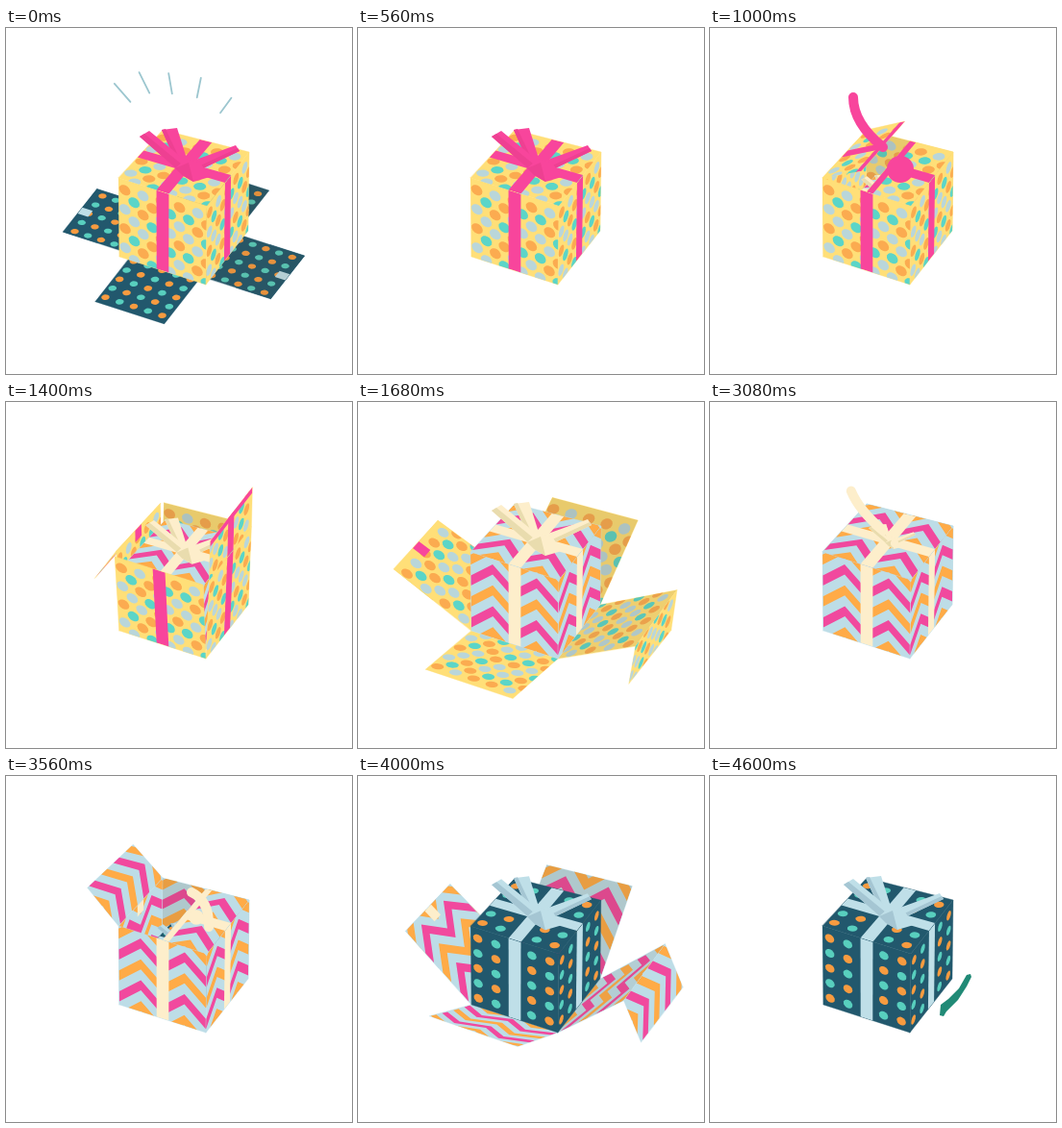
Animation, 360 px wide and 360 px high, one loop 5 s. Source, as an HTML page with a canvas:

```html
<!DOCTYPE html>
<html lang="en">
<head>
<meta charset="utf-8">
<title>Endless gift</title>
<style>
html, body { margin: 0; height: 100%; overflow: hidden; background: #fff; }
canvas { display: block; width: 100vw; height: 100vh; object-fit: contain; }
</style>
</head>
<body>
<canvas id="stage"></canvas>
<script>
const stage = document.getElementById('stage');
const ctx = stage.getContext('2d');
const ratio = window.devicePixelRatio || 1;
stage.width = stage.height = 360 * ratio;

const LOOP = 5000;
const CENTER = [185, 225];
const { sin, cos, PI } = Math;
const rad = deg => deg * PI / 180;
const clamp = x => Math.min(1, Math.max(0, x));
const span = (x, a, b) => clamp((x - a) / (b - a));
const mix = (a, b, k) => a + (b - a) * k;
const easeOut = k => 1 - (1 - k) ** 2;

const yellow = { base: '#ffdf78', ribbon: '#f8459c', shade: '#ee4092', pattern: bigDots };
const zigzag = { base: '#bddde7', ribbon: '#fdeecb', shade: '#e9dcae', pattern: chevrons };
const blue = { base: '#22586d', ribbon: '#bfdfe8', shade: '#a5c6d3', pattern: smallDots };

// Unit cube to stage: x along the front, y into depth, z up.
function project(x, y, z) {
  const lean = z * y * (1 - x);
  return [
    118 + 90 * x + 44 * y - z + 2 * z * x + 2 * lean,
    238 + 29 * x - 56 * y - 82 * z + 6 * lean
  ];
}

function polygon(points, color) {
  ctx.beginPath();
  points.forEach(p => ctx.lineTo(p[0], p[1]));
  ctx.closePath();
  if (color) {
    ctx.fillStyle = color;
    ctx.fill();
  }
}

const patch = (map, u0, u1, v0, v1) =>
  [map(u0, v0), map(u1, v0), map(u1, v1), map(u0, v1)];

function dot(map, u, v, r, color) {
  const ring = [];
  for (let i = 0; i < 18; i++) {
    const a = i * PI / 9;
    ring.push(map(u + r * cos(a), v + r * sin(a)));
  }
  polygon(ring, color);
}

function bigDots(map) {
  const orange = '#fbab50', grey = '#b9d6da', teal = '#5bd5c8';
  const rows = [[orange, grey], [teal, orange], [grey, orange], [grey, teal]];
  for (let row = 0; row < 8; row++) {
    for (let col = 0; col < 5; col++) {
      const u = 0.07 + col * 0.207 + (row % 2) * 0.104;
      dot(map, u, 0.13 + (row - 0) * 0.122, 0.064, rows[row % 4][col % 2 ^ (col > 2)]);
    }
  }
}

function smallDots(map) {
  for (let row = 0; row < 5; row++) {
    for (let col = 0; col < 5; col++) {
      const color = (row + col) % 2 ? '#58cfbe' : '#f79b40';
      dot(map, 0.08 + col * 0.205, 0.13 + row * 0.19, 0.052, color);
    }
  }
}

function chevrons(map) {
  for (let k = 0; k < 6; k++) {
    const top = k * 0.265 - 0.46, upper = [], lower = [];
    for (let i = 0; i <= 4; i++) {
      const v = top + (i % 2 ? 0 : 0.23);
      upper.push(map(i / 4, v));
      lower.unshift(map(i / 4, v + 0.128));
    }
    polygon(upper.concat(lower), k % 2 ? '#ffab47' : '#f1499e');
  }
}

// opts: u range, ribbon along and across, tape on the rim, darkness
function face(map, wrap, { u0 = 0, u1 = 1, band, cross, tape, dark = 0 } = {}) {
  const outline = patch(map, u0, u1, 0, 1);
  ctx.save();
  polygon(outline, wrap.base);
  ctx.strokeStyle = wrap.base;
  ctx.lineWidth = 0.4;
  ctx.lineJoin = 'round';
  ctx.stroke();
  ctx.clip();
  wrap.pattern(map);
  if (band) polygon(patch(map, 0.43, 0.57, 0, 1), wrap.ribbon);
  if (cross) polygon(patch(map, 0, 1, 0.43, 0.57), wrap.ribbon);
  if (tape) polygon(patch(map, 0.43, 0.57, 0, 0.15), wrap.ribbon);
  if (dark) polygon(outline, `rgba(90, 70, 40, ${dark})`);
  ctx.restore();
}

function facesOut(map) {
  const o = map(0, 1), a = map(1, 1), b = map(0, 0);
  return (a[0] - o[0]) * (b[1] - o[1]) - (a[1] - o[1]) * (b[0] - o[0]) < 0;
}

function bow(wrap, size) {
  if (size <= 0) return;
  ctx.save();
  ctx.translate(188, 147);
  ctx.scale(size, size);
  ctx.translate(-188, -147);
  polygon([[162, 106], [178, 104], [190, 142], [179, 144]], wrap.ribbon);
  polygon([[162, 106], [166, 105], [184, 143], [179, 144]], wrap.shade);
  polygon([[139, 113], [149, 107], [187, 138], [178, 147]], wrap.ribbon);
  polygon([[139, 113], [144, 110], [183, 142], [178, 147]], wrap.shade);
  polygon([[239, 122], [243, 128], [203, 147], [192, 139]], wrap.ribbon);
  polygon([[241, 125], [243, 128], [203, 147], [198, 145]], wrap.shade);
  polygon([[176, 146], [187, 136], [202, 140], [212, 155], [195, 160], [183, 153]], wrap.ribbon);
  polygon([[176, 146], [190, 140], [195, 160], [183, 153]], wrap.shade);
  ctx.restore();
}

function curve(from, ctrl, to, width, color) {
  ctx.beginPath();
  ctx.moveTo(...from);
  ctx.quadraticCurveTo(...ctrl, ...to);
  ctx.lineWidth = width;
  ctx.strokeStyle = color;
  ctx.stroke();
}

function untie(wrap, p) {
  bow(wrap, 1 - span(p, 0, 300));
  const knot = 14 * span(p, 100, 300) * (1 - span(p, 540, 760));
  if (knot > 0) {
    ctx.beginPath();
    ctx.arc(mix(188, 198, span(p, 0, 400)), 147, knot, 0, 2 * PI);
    ctx.fillStyle = wrap.ribbon;
    ctx.fill();
  }
  if (p > 60 && p < 560) {
    const up = easeOut(span(p, 60, 440)), away = span(p, 440, 560);
    curve([mix(mix(145, 149, up), 108, away), mix(mix(110, 72, up), 58, away)],
      [mix(mix(160, 149, up), 114, away), mix(mix(124, 99, up), 66, away)],
      [mix(180, 122, away), mix(mix(142, 124, up), 76, away)],
      10 * (1 - away), wrap.ribbon);
  }
  if (p > 520 && p < 760) {
    curve([193, 121], [212, 130], [211, 157],
      10 * span(p, 520, 600) * (1 - span(p, 660, 760)), wrap.ribbon);
  }
}

// Pieces of the wrapping at phase p; each one draws itself.
function pieces(wrap, p) {
  const fall = 90 * span(p, 788, 1188) ** 2;
  const s = sin(rad(fall)), c = cos(rad(fall));
  const frontFall = rad(90 * span(p, 750, 1150) ** 2);
  const leftTurn = 270 * span(p, 385, 900);
  const rightTurn = 270 * span(p, 642, 1242);
  const leftDir = rad(fall - 90 + leftTurn);
  const rightDir = rad(fall - 90 + rightTurn);

  const front = (u, v) => project(u, -1.1 * (1 - v) * sin(frontFall), (1 - v) * cos(frontFall));
  const right = (u, v) => project(1 + (1 - v) * s, u, (1 - v) * c);
  const left = (u, v) => project(-(1 - v) * s, u, (1 - v) * c);
  const back = (u, v) => project(u, 1 + (1 - v) * s, (1 - v) * c);
  const leftLid = (u, v) => project(-s - u * sin(leftDir), 1 - v, c + u * cos(leftDir));
  const rightLid = (u, v) =>
    project(1 + s + (1 - u) * sin(rightDir), 1 - v, c + (1 - u) * cos(rightDir));
  const top = (u, v) => project(u, 1 - v, 1);
  const lid = map => ({ band: facesOut(map), cross: facesOut(map) });

  return {
    leftTurn, rightTurn,
    front: () => face(front, wrap, { band: facesOut(front) }),
    right: () => {
      const out = facesOut(right);
      face(right, wrap, { band: out, tape: !out && rightTurn > 225, dark: out ? 0 : 0.1 });
    },
    left: () => face(left, wrap, { tape: true }),
    back: () => face(back, wrap, { dark: 0.14 }),
    leftLid: () => face(leftLid, wrap, { u1: 0.5, ...lid(leftLid) }),
    rightLid: () => face(rightLid, wrap, { u0: 0.5, ...lid(rightLid) }),
    top: () => face(top, wrap, lid(top))
  };
}

function closedBox(wrap) {
  const box = pieces(wrap, 0);
  box.front();
  box.right();
  box.top();
  bow(wrap, 1);
}

function scaled(k, draw) {
  ctx.save();
  ctx.translate(...CENTER);
  ctx.scale(k, k);
  ctx.translate(-CENTER[0], -CENTER[1]);
  draw();
  ctx.restore();
}

function sparkles(p) {
  const q = span(p, 1180, 1580);
  if (q <= 0 || q >= 1) return;
  const near = 0.55 + 0.5 * q * q, far = 0.55 + 0.5 * easeOut(q);
  ctx.strokeStyle = '#9cc6cf';
  ctx.lineWidth = 2.2 * (1 - q ** 4);
  for (const [x, y] of [[-73, -83], [-47, -95], [-16, -94], [18, -89], [50, -68]]) {
    ctx.beginPath();
    ctx.moveTo(185 + x * near, 140 + y * near);
    ctx.lineTo(185 + x * far, 140 + y * far);
    ctx.stroke();
  }
}

function unwrap(outer, inner, p) {
  if (p <= 0) return closedBox(outer);
  const paper = pieces(outer, p);
  const open = p >= 1080;
  const shrink = p > 1280 ? Math.max(0, 1 - ((p - 1280) / 358) ** 2) : 1;

  if (shrink > 0) scaled(shrink, () => {
    paper.back();
    if (paper.leftTurn >= 180) paper.leftLid();
    paper.left();
    if (open) {
      paper.front();
      if (paper.rightTurn > 225) paper.rightLid();
      paper.right();
      if (paper.rightTurn <= 225) paper.rightLid();
    }
  });

  if (p > 400) scaled(0.6 + 0.4 * easeOut(span(p, 640, 1120)), () => closedBox(inner));

  if (!open) {
    paper.front();
    paper.right();
    if (paper.leftTurn === 0) {
      paper.top();
    } else {
      paper.rightLid();
      if (paper.leftTurn < 180) paper.leftLid();
    }
    untie(outer, p);
  }
  sparkles(p);
}

function streak() {
  polygon([[267, 207], [271, 206], [272, 209], [267, 219], [258, 233], [246, 245],
    [243, 250], [239, 249], [240, 238], [248, 232], [259, 221]], '#208a76');
}

function render(t) {
  ctx.setTransform(ratio, 0, 0, ratio, 0, 0);
  ctx.fillStyle = '#fff';
  ctx.fillRect(0, 0, 360, 360);
  ctx.lineCap = 'round';
  if (t < 280) unwrap(blue, yellow, t + 1440);
  else if (t < 2280) unwrap(yellow, zigzag, t - 560);
  else unwrap(zigzag, blue, t - 2920);
  if (t >= 4600) streak();
}

const start = performance.now();
function tick() {
  const t = (performance.now() - start) % LOOP;
  render(Math.floor(t / 40) * 40);
  requestAnimationFrame(tick);
}
tick();
</script>
</body>
</html>
```
